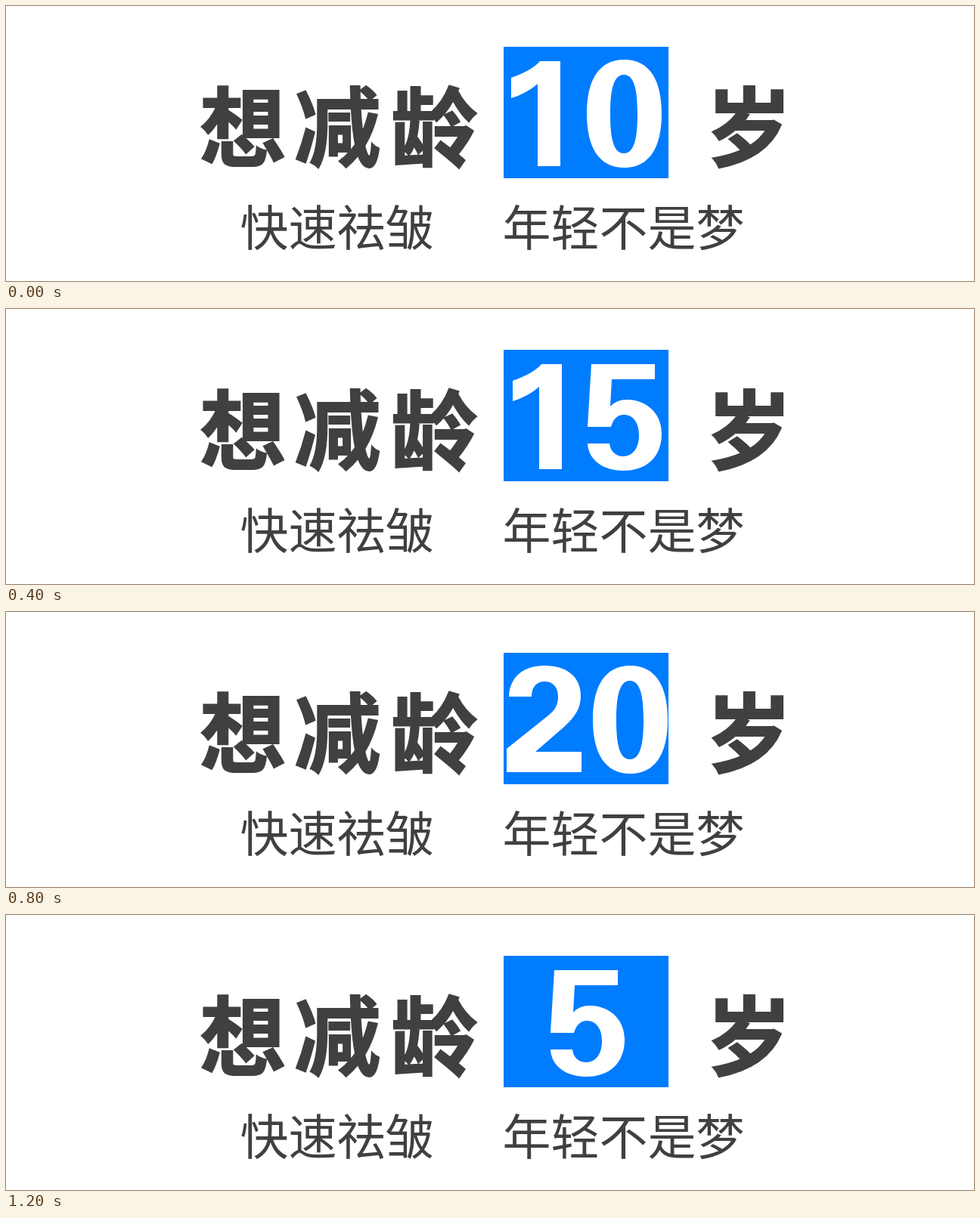
These frames come from a looping animation (1280 px wide and 364 px high, 1.6 s). An HTML page:

```html
<!DOCTYPE html>
<html lang="zh-CN">
<head>
<meta charset="utf-8">
<style>
  html, body { margin: 0; width: 100%; height: 100%; overflow: hidden; background: #fff; }
  svg { display: block; width: 1280px; height: 364px; }
  text { font-family: "Noto Sans CJK SC", "Noto Sans CJK", sans-serif; fill: #404040; }
  .title { font-size: 114px; font-weight: 700; stroke: #404040; stroke-width: 2px; }
  .sub { font-size: 64px; font-weight: 400; }
</style>
</head>
<body>
<svg viewBox="0 0 1280 364">
  <g class="title">
    <text y="202.5" x="256 381.5 509">想减龄</text>
    <text y="202.5" x="925.5">岁</text>
  </g>
  <g class="sub">
    <text x="309.5" y="317">快速祛皱</text>
    <text x="656.5" y="317">年轻不是梦</text>
  </g>
  <path fill="#007cff" d="M658 54H876V228H658Z"/>
  <defs>
    <path id="d0" d="M49.5-2C83-2 99 25 99 69.5S83 141 49.5 141 0 114 0 69.5 16-2 49.5-2ZM49 18C36 18 31 36 31 70S36 122 49 122 67 104 67 70 62 18 49 18Z"/>
    <path id="d1" d="M65 0V139H35V30Q20 43 0 49V22Q28 12 38 0Z"/>
    <path id="d2" d="M3 39C4 13 22-2 50-2 80-2 98 13 98 38 98 55 90 66 76 79L38 112H99V139H0V108L55 64C64 57 68 50 68 39 68 26 61 19 50 19 39 19 33 27 33 39Z"/>
    <path id="d5" d="M5 0H89V20H32L30 56Q38 47 52 47C79 47 98 66 98 92 98 122 79 141 47 141 21 141 1 127 0 105H29C30 115 37 122 47 122 60 122 68 111 68 94 68 77 60 67 48 67 39 67 34 73 31 83H0Z"/>
  </defs>
  <g fill="#fff" fill-rule="evenodd">
    <g class="number"><use href="#d1" x="668" y="73"/><use href="#d0" x="768" y="73"/></g>
    <g class="number"><use href="#d1" x="670" y="73"/><use href="#d5" x="769" y="73"/></g>
    <g class="number"><use href="#d2" x="662" y="73"/><use href="#d0" x="776" y="73"/></g>
    <g class="number"><use href="#d5" x="720" y="73"/></g>
  </g>
</svg>
<script>
  const STEP = 400;
  const numbers = [...document.querySelectorAll('.number')];

  function draw(now) {
    const current = Math.floor(now / STEP) % numbers.length;
    numbers.forEach((n, i) => n.style.display = i === current ? '' : 'none');
    requestAnimationFrame(draw);
  }
  draw(performance.now());
</script>
</body>
</html>
```
